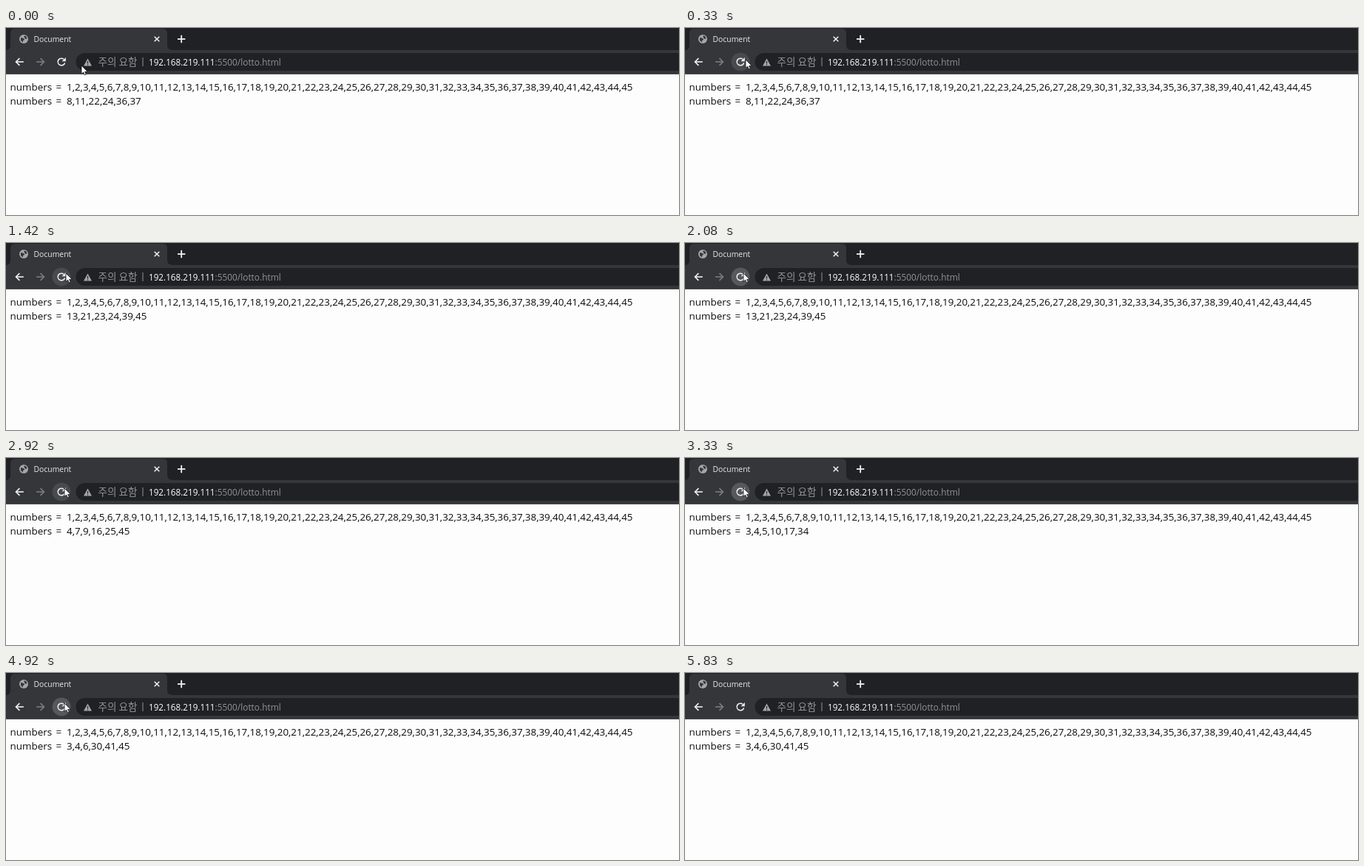
Animation, 910 px wide and 254 px high, one loop 6.33 s. Source, as an HTML page with a canvas:

```html
<!DOCTYPE html>
<html lang="ko">
<head>
<meta charset="utf-8">
<title>Lotto</title>
<style>
html, body { margin: 0; width: 100%; height: 100%; overflow: hidden; background: #fdfdfd; }
canvas { display: block; width: 910px; height: 254px; }
</style>
</head>
<body>
<canvas id="stage"></canvas>
<script>
const LOOP = 6330;
const SANS = '"Open Sans", "Noto Sans", sans-serif';
const HANGUL = '"Noto Sans CJK KR", "Noto Sans CJK", sans-serif';
const STRIP = '#202124';
const TOOLBAR = '#35363a';
const LIGHT = '#f1f1f2';
const MUTED = '#929396';
const INK = '#0c0c0c';

const canvas = document.getElementById('stage');
const ratio = window.devicePixelRatio || 1;
canvas.width = 910 * ratio;
canvas.height = 254 * ratio;
const ctx = canvas.getContext('2d');
ctx.scale(ratio, ratio);

const allNumbers = Array.from({ length: 45 }, (_, i) => i + 1).join(',');

// [start time, drawn numbers]
const draws = [
  [0, '8,11,22,24,36,37'],
  [820, '13,21,23,24,39,45'],
  [2100, '4,7,9,16,25,45'],
  [3230, '3,4,5,10,17,34'],
  [4730, '3,4,6,30,41,45']
];

// [time, x, y] of the pointer tip
const path = [
  [0, 102, 51], [40, 102, 51], [330, 82, 43], [670, 81, 41],
  [1420, 81, 41], [1790, 79, 41], [5080, 79, 41], [5600, 112, 262]
];

function text(str, x, y, size, color, family = SANS) {
  ctx.font = `${size}px ${family}`;
  ctx.fillStyle = color;
  ctx.fillText(str, x, y);
}

function line(points, color, width) {
  ctx.beginPath();
  points.forEach(([x, y], i) => i ? ctx.lineTo(x, y) : ctx.moveTo(x, y));
  ctx.strokeStyle = color;
  ctx.lineWidth = width;
  ctx.stroke();
}

function poly(points, color) {
  ctx.beginPath();
  points.forEach(([x, y]) => ctx.lineTo(x, y));
  ctx.closePath();
  ctx.fillStyle = color;
  ctx.fill();
}

function disc(x, y, r, color) {
  ctx.beginPath();
  ctx.arc(x, y, r, 0, Math.PI * 2);
  ctx.fillStyle = color;
  ctx.fill();
}

function rect(x, y, w, h, color) {
  ctx.fillStyle = color;
  ctx.fillRect(x, y, w, h);
}

function drawTab() {
  rect(0, 0, 910, 30, STRIP);
  rect(0, 30, 910, 33, TOOLBAR);
  rect(0, 62, 910, 1, '#4a4b50');

  ctx.beginPath();
  ctx.moveTo(0, 30);
  ctx.quadraticCurveTo(6, 30, 6, 23);
  ctx.lineTo(6, 7);
  ctx.quadraticCurveTo(6, 1, 12, 1);
  ctx.lineTo(212, 1);
  ctx.quadraticCurveTo(218, 1, 218, 7);
  ctx.lineTo(218, 23);
  ctx.quadraticCurveTo(218, 30, 225, 30);
  ctx.fillStyle = TOOLBAR;
  ctx.fill();

  drawGlobe(24, 15);
  text('Document', 37.5, 18.6, 10.4, '#e8e9ea');
  line([[200.7, 11.7], [207.3, 18.3]], LIGHT, 1.5);
  line([[207.3, 11.7], [200.7, 18.3]], LIGHT, 1.5);
  line([[232, 15], [242.4, 15]], LIGHT, 1.8);
  line([[237.2, 9.8], [237.2, 20.2]], LIGHT, 1.8);
}

function drawGlobe(x, y) {
  disc(x, y, 6, '#a4a6a9');
  poly([[x - 4, y - 2], [x, y - 1], [x + 1, y + 1], [x - 1, y + 2], [x - 1, y + 4.5], [x - 4, y + 2]], TOOLBAR);
  poly([[x, y - 4.6], [x + 3, y - 4], [x + 4.6, y - 1], [x + 2, y], [x + 1, y - 2]], TOOLBAR);
}

function arrow(x, y, dir, color) {
  line([[x - 5 * dir, y], [x + 5.4 * dir, y]], color, 1.6);
  line([[x, y - 4.9], [x - 4.9 * dir, y], [x, y + 4.9]], color, 1.6);
}

function drawReload(hover, press) {
  if (hover) disc(75, 46, 12.5, press ? '#57585c' : '#494a4e');
  ctx.beginPath();
  ctx.arc(75, 46, 4.8, 0.3, Math.PI * 1.72);
  ctx.strokeStyle = LIGHT;
  ctx.lineWidth = 1.6;
  ctx.stroke();
  poly([[80.8, 40], [80.8, 45.2], [75.6, 45.2]], LIGHT);
}

function drawToolbar(hover, press) {
  arrow(18.4, 46, 1, LIGHT);
  arrow(46.5, 46, -1, '#7c7d81');
  drawReload(hover, press);

  ctx.beginPath();
  ctx.arc(106.5, 46, 12, Math.PI / 2, Math.PI * 1.5);
  ctx.lineTo(910, 34);
  ctx.lineTo(910, 58);
  ctx.closePath();
  ctx.fillStyle = STRIP;
  ctx.fill();

  poly([[110.5, 41.5], [116, 51.5], [105, 51.5]], '#a4a6a9');
  line([[110.5, 45], [110.5, 48.4]], STRIP, 1.2);
  line([[110.5, 49.3], [110.5, 50.5]], STRIP, 1.2);
  text('주의 요함', 124.5, 50.8, 13.6, MUTED, HANGUL);
  line([[185, 40], [185, 52]], MUTED, 1);
  text('192.168.219.111', 193, 50.5, 11.7, '#ffffff');
  text(':5500/lotto.html', 282.5, 50.5, 11.9, MUTED);
}

function drawRow(list, y) {
  text('numbers', 5.5, y, 13.42, INK);
  text('=', 67.5, y, 13.42, INK);
  text(list, 82, y, 13.42, INK);
}

function pointerAt(t) {
  const i = path.findIndex(p => p[0] > t);
  if (i < 0) return null;
  const [t0, x0, y0] = path[i - 1];
  const [t1, x1, y1] = path[i];
  let k = (t - t0) / (t1 - t0);
  k = t0 >= 5080 ? k * k : k * (2 - k);
  return [x0 + (x1 - x0) * k, y0 + (y1 - y0) * k];
}

function drawPointer([x, y]) {
  const shape = [[0, 0], [0, 11.5], [2.6, 9.1], [4.4, 13], [6.3, 12.1], [4.6, 8.4], [8.2, 8.2]]
    .map(([dx, dy]) => [x + dx, y + dy]);
  poly(shape, '#fff');
  ctx.strokeStyle = '#111';
  ctx.lineWidth = 0.8;
  ctx.stroke();
}

function render(t) {
  rect(0, 0, 910, 254, '#fdfdfd');
  const tip = pointerAt(t);
  const hover = tip && Math.hypot(tip[0] - 75, tip[1] - 46) < 13;
  const press = draws.some(([start]) => start && t >= start - 180 && t < start + 250);
  drawTab();
  drawToolbar(hover, press);
  drawRow(allNumbers, 85.3);
  drawRow(draws.filter(d => d[0] <= t).pop()[1], 104.3);
  if (tip) drawPointer(tip);
}

const begin = performance.now();
function tick() {
  render((performance.now() - begin) % LOOP);
  requestAnimationFrame(tick);
}
tick();
</script>
</body>
</html>
```
